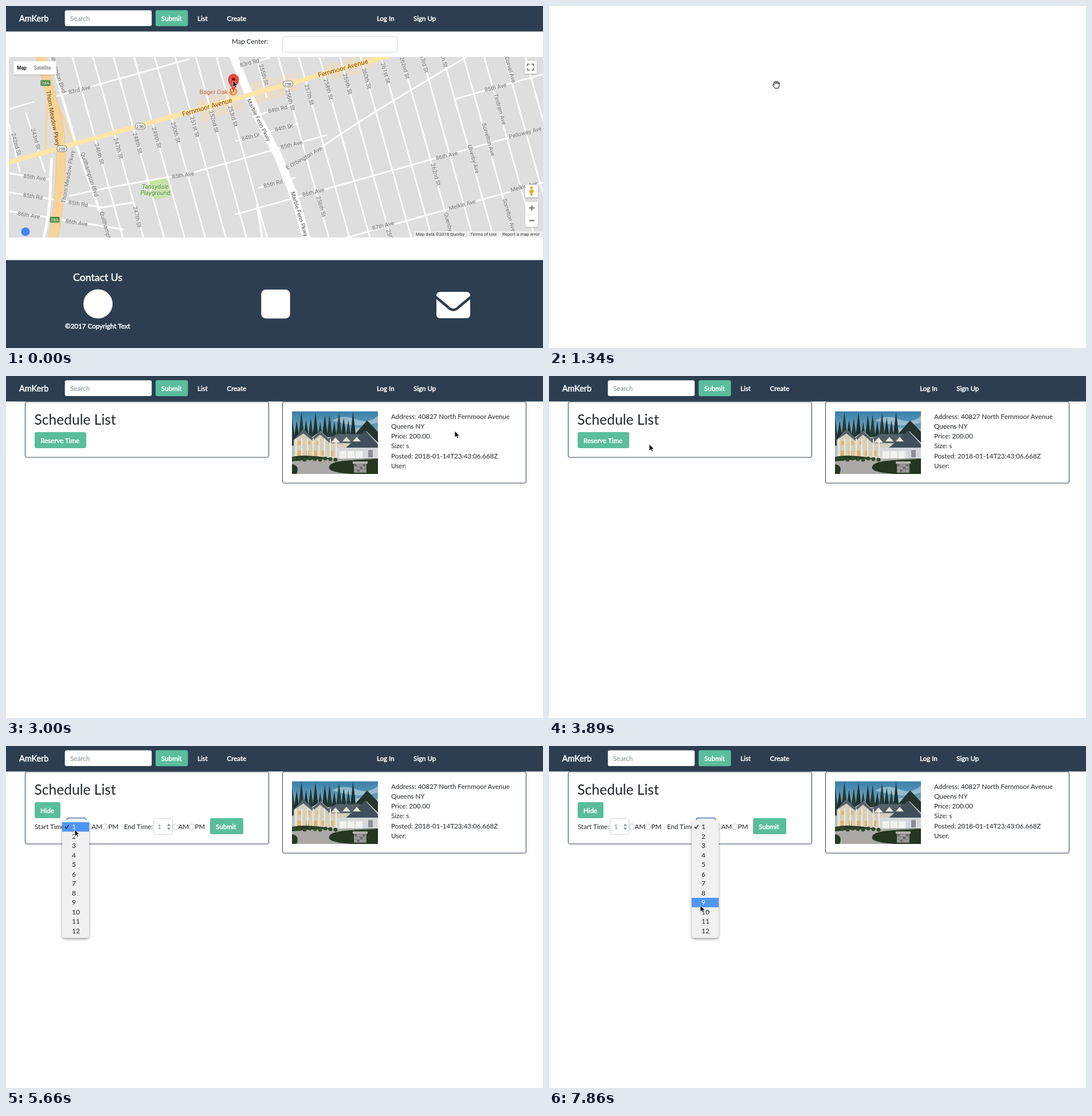
Animation of 937x597 px, one loop 8 s. Source, as an HTML page:

```html
<!DOCTYPE html>
<html lang="en">
<head>
<meta charset="utf-8">
<title>Parking schedule</title>
<style>
  html, body { margin: 0; width: 100%; height: 100%; overflow: hidden; background: #fefefe; }
  svg { display: block; }
  #stage { position: absolute; left: 0; top: 0; font: 11.6px Lato, sans-serif; fill: #212529; }
  .light { fill: #fff; stroke: #fff; stroke-width: .5px; }
  .map { font-family: Roboto, sans-serif; font-size: 10px; }
  .label { text-anchor: middle; fill: #757575; stroke: #e4e4e4; stroke-width: 2px; paint-order: stroke; stroke-linejoin: round; }
  .road { fill: none; stroke: #fff; stroke-linejoin: round; }
</style>
</head>
<body>
<svg id="stage" width="937" height="597" viewBox="0 0 937 597"></svg>
<script>
const NAVY = '#2c3e50', GREEN = '#5abd9c', DARK_GREEN = '#4ba487', GRAY = '#7b8a8b';
const LOOP = 8000;
const stage = document.getElementById('stage');

const rect = (x, y, w, h, fill, extra = '') =>
  `<rect x="${x}" y="${y}" width="${w}" height="${h}" fill="${fill}" ${extra}/>`;
const circle = (x, y, r, fill, extra = '') =>
  `<circle cx="${x}" cy="${y}" r="${r}" fill="${fill}" ${extra}/>`;
const path = (d, extra = '') => `<path d="${d}" ${extra}/>`;
const text = (x, y, str, extra = '') => `<text x="${x}" y="${y}" ${extra}>${str}</text>`;
const group = (id, body, extra = '') => `<g id="${id}" ${extra}>${body}</g>`;
const range = (n, fn) => Array.from({ length: n }, (_, i) => fn(i)).join('');

const button = (x, y, w, str, id = '') =>
  rect(x, y, w, 28, GREEN, `rx="3" ${id && `id="${id}"`}`) + text(x + 10, y + 18.5, str, 'class="light"');
const field = (x, y, w, h = 28) =>
  rect(x + .5, y + .5, w - 1, h - 1, '#fff', 'rx="3" stroke="#ced4da"');

// ---- header and footer ----
const header = rect(0, 0, 937, 44.5, NAVY) +
  text(23, 26.5, 'AmKerb', 'class="light" font-size="14.4"') +
  rect(102.7, 7.6, 151.5, 27.4, '#fff', 'rx="3"') + text(112, 26, 'Search', `fill="${GRAY}"`) +
  button(261, 7.3, 56.5, 'Submit') +
  [[334, 'List'], [385.5, 'Create'], [647, 'Log In'], [711, 'Sign Up']]
    .map(([x, s]) => text(x, 26, s, 'class="light"')).join('');

const footer = rect(0, 443.5, 937, 154, NAVY) +
  text(117, 480, 'Contact Us', 'class="light" font-size="17.7"') +
  circle(160.5, 520, 25.5, '#fff') +
  rect(445.3, 495, 50.4, 50.4, '#fff', 'rx="8"') +
  rect(751, 499, 59, 46, '#fff', 'rx="6"') +
  path('M750 508 L771 525.5 Q780.5 535.5 790 525.5 L811 508', `fill="none" stroke="${NAVY}" stroke-width="4.5"`) +
  text(103, 563, '©2017 Copyright Text', 'class="light"');

// ---- map ----
const SLOPE = .281;
const avenueY = (x, offset) => 274.4 - SLOPE * x + offset;
const road = (d, width = 2.8, color = '#fff') =>
  path(d, `class="road" style="stroke:${color};stroke-width:${width}px"`);
const avenue = ([offset, x1, x2]) =>
  road(`M${x1} ${avenueY(x1, offset)}L${x2} ${avenueY(x2, offset)}`);
const label = ([str, x, y, angle, extra = '']) =>
  `<text class="label" transform="translate(${x} ${y}) rotate(${angle})" y="3.5" ${extra}>${str}</text>`;

// Streets 8 and 9 are interrupted by the wide parkway.
const streetX = (i, y) => 163 + 33.3 * i + .28 * (y - 258 + 9.4 * i);
const street = i => i === 8 || i === 9 ? '' :
  road(`M${streetX(i, 80)} 80L${streetX(i, 410)} 410`);
const ordinal = n => n + (['st', 'nd', 'rd'][n % 10 - 1] || 'th') + ' St';
const streetLabel = i => i === 8 || i === 9 ? '' :
  label([ordinal(246 + i), 163 + 33.3 * i, 258 - 9.4 * i, 74]);

const shield = ([x, y]) => rect(x - 8.5, y - 5, 17, 10, '#fff', 'rx="4" stroke="#777"') +
  text(x, y + 2.8, '25B', 'font-size="7.5" text-anchor="middle" fill="#444"');
const exitSign = ([x, y]) => rect(x - 8.5, y - 5, 17, 10, '#4c8b45', 'rx="1"') +
  text(x, y + 2.8, '28A', 'font-size="7.5" text-anchor="middle" fill="#fff"');
const control = (x, y, w, h) => rect(x, y, w, h, '#fff', 'rx="1" filter="url(#soft)"');

const BROWN = 'style="fill:#8a4a14;stroke:#ffe6a6" font-size="11.5"';
const BLACK = 'style="fill:#555;stroke:#fff"';
const STEEP = 74;
const names = [
  ['83rd Ave', 128, 146, -14], ['83rd Rd', 425, 99, -15], ['255th St', 450, 120, 74],
  ['84th Rd', 474, 180, -12], ['84th Dr', 485, 212, -14], ['84th Dr', 427, 228, -14],
  ['85th Ave', 498, 242, -14], ['85th Ave', 309, 295, -9], ['85th Rd', 466, 310, -14],
  ['86th Ave', 536, 325, -14], ['86th Ave', 769, 261, -14], ['87th Ave', 658, 383, -14],
  ['85th Ave', 854, 142, -14], ['85th Ave', 50, 299, 7], ['85th Rd', 47, 332, 9],
  ['86th Ave', 40, 365, 9], ['85th Rd', 126, 345, 9], ['86th Ave', 123, 378, 9],
  ['243rd St', 52, 232, STEEP], ['242nd St', 18, 241, STEEP], ['247th St', 229, 368, 78],
  ['256th St', 550, 350, STEEP], ['262nd St', 750, 294, STEEP], ['259th St', 672, 408, STEEP],
  ['E Orbington Ave', 520, 265, -30], ['Melkin Ave', 796, 347, -15], ['Melkin Ave', 904, 315, -15],
  ['Pelloway Ave', 906, 221, -15], ['Tindram Ave', 862, 180, 74], ['Corvel Ave', 880, 111, 74],
  ['Sorrelton Ave', 842, 233, 74], ['Ulverby Ave', 816, 267, 74], ['Sorrelton Ave', 878, 365, 74],
  ['Quenby Ave', 774, 386, 76], ['Quillhampton Blvd', 89, 113, 72],
  ['Quillhampton Blvd', 146, 294, 72], ['Quillhampton Blvd', 178, 398, 74],
  ['Thorn Meadow Pkwy', 108, 298, -80],
  ['Thorn Meadow Pkwy', 82, 196, 80, 'style="fill:#6d461b;stroke:#f8d49a" font-size="10.5"'],
  ['Marble Fenn Pkwy', 441, 199, 64, BLACK], ['Marble Fenn Pkwy', 512, 363, 73, BLACK],
  ['Fernmoor Avenue', 351, 177, -16, BROWN], ['Fernmoor Avenue', 588, 109, -16, BROWN],
];

const pin = path('M397 150 C396 141 388 137 388 128 a9 9 0 0 1 18 0 C406 137 398 141 397 150Z',
  'fill="#ea4c40" stroke="#b32d25" stroke-width=".8"') + circle(397, 128, 3, '#6d1712');

const PARKWAY = 'M60 84 C72 140 97 200 96 262 S92 350 82 408';
const mapArt = rect(5, 89, 932, 315, '#dedede') +
  path('M333 166 396 149 414 178 342 203Z M428 134 508 116 513 146 424 176Z M548 106 610 89 668 89 622 117 566 130Z', 'fill="#e9dccb"') +
  path('M249 305 284 300 289 332 257 338Z', 'fill="#c5e3a3"') +
  range(24, street) +
  [[-92, 85, 320], [-55, 397, 460], [39, 430, 500], [74, 400, 510], [108, 330, 560], [108, 785, 937],
   [167, 440, 505], [202, 400, 937], [297, 590, 937]].map(avenue).join('') +
  road('M330 290 C250 306 180 314 110 332') +
  road('M5 292 75 303 M5 325 170 352 M5 358 205 390 M5 180 50 167 M165 352 222 343') +
  road('M803 89 C735 130 650 178 560 240 L490 284') +
  road('M438 345 447 404', 4) + road('M437 89 455 160') +
  road('M34 185 68 290 M5 205 24 290') +
  road('M78 89 100 165 121 238 150 320 180 404', 4.5) +
  road('M80 265 C75 300 82 340 66 404', 5) +
  road('M76 150 C68 190 72 220 68 258 M84 165 C100 185 108 220 118 240', 3.5, '#f8d49a') +
  road(PARKWAY, 17, '#eec27d') + road(PARKWAY, 15.5, '#f8d397') +
  road('M395 84 418 140 441 197 475 262 500 325 513 365 525 408', 14) +
  road(`M0 274.4 L680 ${avenueY(680, 0)}`, 8, '#ffe6a6') +
  range(19, streetLabel) + names.map(label).join('') +
  ['Tansydale', 'Playground'].map((s, i) =>
    label([s, 260.5, 315 + 11 * i, 0, 'style="fill:#4b8f25;stroke:#e0ead5" font-style="italic" font-size="10.8"'])).join('') +
  [[97.5, 249], [234, 210], [492, 136]].map(shield).join('') + [[69, 134.5], [85, 373]].map(exitSign).join('') +
  text(387, 154, 'Bagel Oak', 'text-anchor="end" font-size="11" fill="#c05a1c" stroke="#eee" stroke-width="2" paint-order="stroke"') +
  circle(396.5, 149.5, 7.5, '#ee8d33', 'stroke="#fff" stroke-width=".7"') +
  path('M394 145v4M396 145v9M399 145v9', 'stroke="#fff" stroke-width="1.2"') + pin +
  circle(34, 394, 7.5, '#4285f4') +
  rect(712, 393, 225, 11, '#f5f5f5', 'opacity=".7"') +
  [[715, 'Map data ©2018 Quorby'], [810, 'Terms of Use'], [866, 'Report a map error']]
    .map(([x, s]) => text(x, 401, s, 'font-size="7.8" fill="#333"')).join('') +
  control(13, 96.5, 75, 23) +
  text(19, 111, 'Map', 'font-size="8.46" font-weight="500" fill="#000"') +
  text(48.5, 111, 'Satellite', 'font-size="8.46" fill="#565656"') +
  control(905, 96, 21, 22) +
  path('M910 105v-3.5h3.5M917 101.5h3.5v3.5M920.5 108.5v3.5h-3.5M913.5 112h-3.5v-3.5', 'fill="none" stroke="#666" stroke-width="1.6"') +
  control(906, 312, 22, 22) + circle(917, 317.5, 2.6, '#f4b02c') +
  path('M913 321h8l-1 5h-1l-.5 5h-3l-.5-5h-1Z', 'fill="#f0a51f"') +
  control(906, 342, 22, 43.5) + path('M908 363.5h18', 'stroke="#e6e6e6"') +
  path('M913 352.5h9M917.5 348v9M913 374.5h9', 'stroke="#666" stroke-width="1.8"');

const mapPage = text(394, 66, 'Map Center:') + field(482, 53, 201.5) +
  group('map', mapArt, 'class="map" clip-path="url(#mapClip)"') + footer;

// ---- listing photo ----
const tree = i => {
  const x = i * 8.2, top = 1 + 9 * (1 + Math.sin(i * 2.3)), w = 7;
  return path(`M${x} ${top}L${x + w} 60H${x - w}Z`, `fill="${i % 2 ? '#1d302f' : '#263c37'}"`);
};
const windows = (x, y, n, gap, w, h) => range(n, i => rect(x + i * gap, y, w, h, '#e3b269'));
const photo = `<svg x="499" y="61.5" width="150" height="109.5" viewBox="0 0 150 110" preserveAspectRatio="none">
  ${rect(0, 0, 150, 110, 'url(#sky)')}
  ${path('M70 16Q90 5 112 14T150 8V20Q120 28 92 22ZM95 35Q120 24 150 32V44H95Z', 'fill="#b8d3dc" opacity=".65"')}
  ${range(14, tree)}
  ${path('M112 38 131 16 150 36V55H108Z', 'fill="#23352e"')}
  ${path('M3 50 20 32 34 46 50 35 62 46 94 41 112 51 130 35 150 55V86H3Z', 'fill="#d3cfbf"')}
  ${path('M2 51 20 32 36 47 49 35 63 48 78 40H120L148 56H66L49 41 36 52 20 39Z', 'fill="#52616a"')}
  ${path('M94 64 128 34 150 58V64Z', 'fill="#3f4f5c"')}
  ${path('M68 55 76 46 84 55ZM88 53 95 45 102 53ZM106 53 113 45 120 53Z', 'fill="#eee7d4"')}
  ${windows(11, 52, 3, 16, 5, 7)}${windows(10, 69, 5, 14, 6, 10)}
  ${range(8, i => rect(6 + i * 10, 48, 2, 36, '#f1ecdd'))}
  ${rect(78, 64, 72, 21, '#d3d9da')}${range(3, i => rect(83 + i * 14, 70, 12, 13, '#f0f2ee'))}
  ${rect(133, 68, 8, 13, '#8b9096')}
  ${path('M0 80Q25 74 75 84L150 83V110H0Z', 'fill="#263824"')}
  ${path('M0 88Q40 82 150 84Q70 86 65 97T110 110H8Q14 95 0 93Z', 'fill="#aaa9a6"')}
  ${path('M66 95Q72 84 150 85V110H104Q72 107 66 95Z', 'fill="#24361f"')}
  ${range(9, i => circle(4 + i * 9, 83 + i % 3, 3.5, '#314a2a'))}
  ${rect(108, 91, 22, 17, '#8a8885')}${rect(106, 88, 26, 4, '#b6b3ad')}
  ${range(12, i => rect(109 + i % 4 * 5, 93 + Math.floor(i / 4) * 5, 3.5, 3, i % 3 ? '#a5a29d' : '#65645f'))}
</svg>`;

// ---- listing page ----
const details = ['Address: 40827 North Fernmoor Avenue', 'Queens NY', 'Price: 200.00', 'Size: s',
  'Posted: 2018-01-14T23:43:06.668Z', 'User:'];
const MENU_SHIFT = 151, ROW = 16.5, MENU_TOP = 133;

const timePicker = (x, caption, captionX) =>
  text(captionX, 145, caption) + field(x, 126, 34, 29) +
  text(x + 7.5, 145, '1', `fill="${GRAY}"`) +
  path(`M${x + 24} 139.5l3-4 3 4ZM${x + 24} 142.5l3 4 3-4Z`, `fill="${GRAY}"`) +
  [38.5, 67].map(dx => circle(x + dx, 141, 5, '#fff', 'stroke="#aaa" stroke-width=".8"')).join('') +
  text(x + 43.5, 145, 'AM') + text(x + 72.5, 145, 'PM');

const form = timePicker(106, 'Start Time:', 50) + timePicker(257, 'End Time:', 206) + button(356, 126, 58, 'Submit');

const menu = (id, shift) => group(id,
  rect(98, 129, 47, 206, '#f1f1f1', 'rx="5" filter="url(#shadow)"') +
  rect(98, 0, 47, ROW, '#4f95f8', 'class="bar"') +
  path('M103 141l2.5 3 4-6.5', 'fill="none" stroke="#222" stroke-width="1.4"') +
  range(12, i => text(115, 145 + i * ROW, i + 1, 'class="item" font-size="12"')),
  `transform="translate(${shift} 0)"`);
const ring = (id, x) => rect(x, 125.5, 34, 30, 'none', `id="${id}" rx="4" stroke="#5c86b5" stroke-width="1.6"`);

const listingPage =
  rect(33.5, 45, 425, 97, '#fff', `id="card" rx="3" stroke="${NAVY}"`) +
  rect(482.5, 45, 425, 142, '#fff', `rx="3" stroke="${NAVY}"`) + photo +
  details.map((s, i) => text(672, 74.5 + i * 17.3, s)).join('') +
  text(49.5, 85, 'Schedule List', 'font-size="24.6"') +
  group('reserve', button(50, 98, 90, 'Reserve Time', 'reserveFill')) +
  group('formGroup', rect(48, 96, 49, 32, '#a9ddcb', 'id="hideGlow" rx="5"') +
    button(50, 98, 45, 'Hide', 'hideFill') + form + ring('startRing', 106) + ring('endRing', 257)) +
  menu('startMenu', 0) + menu('endMenu', MENU_SHIFT);

// ---- cursors, drawn from their hot spot ----
const arrow = path('M0 0V11.5L2.7 9 4.6 13 6.4 12.2 4.7 8.3H8Z', 'fill="#111" stroke="#fff" stroke-width=".7"');
const hand = path('M-2 13.5C-3 11-6 9-5.5 7.5Q-4.5 6.5-3 8.5L-4 3.5Q-3.5 1.5-2 3L-1 6-1.3 2Q0 0 1 2L1.3 6 2 2Q3.4.5 4 2.5L3.8 6.5 5 4Q6.8 3.5 6.5 6L4.5 13.5Z',
  'fill="#fff" stroke="#111" stroke-width="1" stroke-linejoin="round"');

stage.innerHTML = `<defs>
  <clipPath id="mapClip">${rect(5, 89, 932, 315, '#fff')}</clipPath>
  <linearGradient id="sky" x2="0" y2="1"><stop stop-color="#397fa9"/><stop offset=".55" stop-color="#9bc3d1"/></linearGradient>
  <filter id="soft"><feDropShadow dx="0" dy="1" stdDeviation="1" flood-opacity=".25"/></filter>
  <filter id="shadow" x="-30%" width="160%"><feDropShadow dx="0" dy="2" stdDeviation="2" flood-opacity=".4"/></filter>
</defs>` +
  group('listingPage', listingPage) + group('mapPage', mapPage) + group('header', header) +
  group('cursor', group('arrow', arrow) + group('hand', hand));

const el = Object.fromEntries([...stage.querySelectorAll('[id]')].map(node => [node.id, node]));
const show = (node, on) => node.setAttribute('display', on ? 'inline' : 'none');

// Time, x and y of each cursor stop; the pointer jumps between them.
const stops = [
  [0, 396, 130], [2270, 410, 125], [2420, 475, 94], [2560, 580, 67], [2710, 690, 65], [2850, 762, 82],
  [3000, 783, 96], [3150, 735, 108], [3290, 636, 118], [3440, 505, 125], [3590, 380, 127], [3740, 260, 123],
  [3890, 175, 119], [4180, 138, 115], [4330, 110, 112], [4630, 108, 112], [4920, 112, 122], [5070, 119, 133],
  [5220, 122, 138], [5660, 120, 146], [5810, 120, 170], [5960, 126, 212], [6100, 155, 230], [6250, 230, 200],
  [6400, 288, 170], [6540, 290, 152], [6690, 282, 143], [6830, 275, 140], [6980, 271, 139],
  [7570, 268, 170], [7710, 265, 230], [7860, 264, 278],
];

function drawMenu(node, shift, opacity, x, y) {
  show(node, opacity > 0);
  node.setAttribute('opacity', opacity);
  const inside = x >= 98 + shift && x <= 145 + shift && y >= MENU_TOP;
  const row = inside ? Math.floor((y - MENU_TOP) / ROW) : -1;
  const bar = node.querySelector('.bar');
  show(bar, inside);
  bar.setAttribute('y', MENU_TOP + row * ROW);
  node.querySelectorAll('.item').forEach((item, i) => item.setAttribute('fill', i === row ? '#fff' : '#212529'));
}

function draw(t) {
  const [, x, y] = stops.findLast(stop => stop[0] <= t);
  const expanded = t >= 4630;
  show(el.mapPage, t < 1340);
  show(el.header, t < 1340 || t >= 1490);
  show(el.listingPage, t >= 1490);

  el.card.setAttribute('height', expanded ? 126 : 97);
  show(el.reserve, !expanded);
  show(el.formGroup, expanded);
  el.reserveFill.setAttribute('fill', t >= 4180 ? DARK_GREEN : GREEN);
  el.hideFill.setAttribute('fill', t < 5070 ? DARK_GREEN : GREEN);
  show(el.hideGlow, t < 5360);
  show(el.startRing, t >= 5360 && t < 7420);
  show(el.endRing, t >= 7420);

  const fade = t < 6830 ? 1 : t < 6980 ? .6 : t < 7120 ? .25 : 0;
  drawMenu(el.startMenu, 0, t >= 5360 ? fade : 0, x, y);
  drawMenu(el.endMenu, MENU_SHIFT, t >= 7420 ? 1 : 0, x, y);

  const grabbing = t >= 600 && t < 2270;
  show(el.hand, grabbing);
  show(el.arrow, !grabbing);
  el.cursor.setAttribute('transform', `translate(${x} ${y})`);
}

function tick() {
  draw(performance.now() % LOOP);
  requestAnimationFrame(tick);
}
tick();
</script>
</body>
</html>
```
